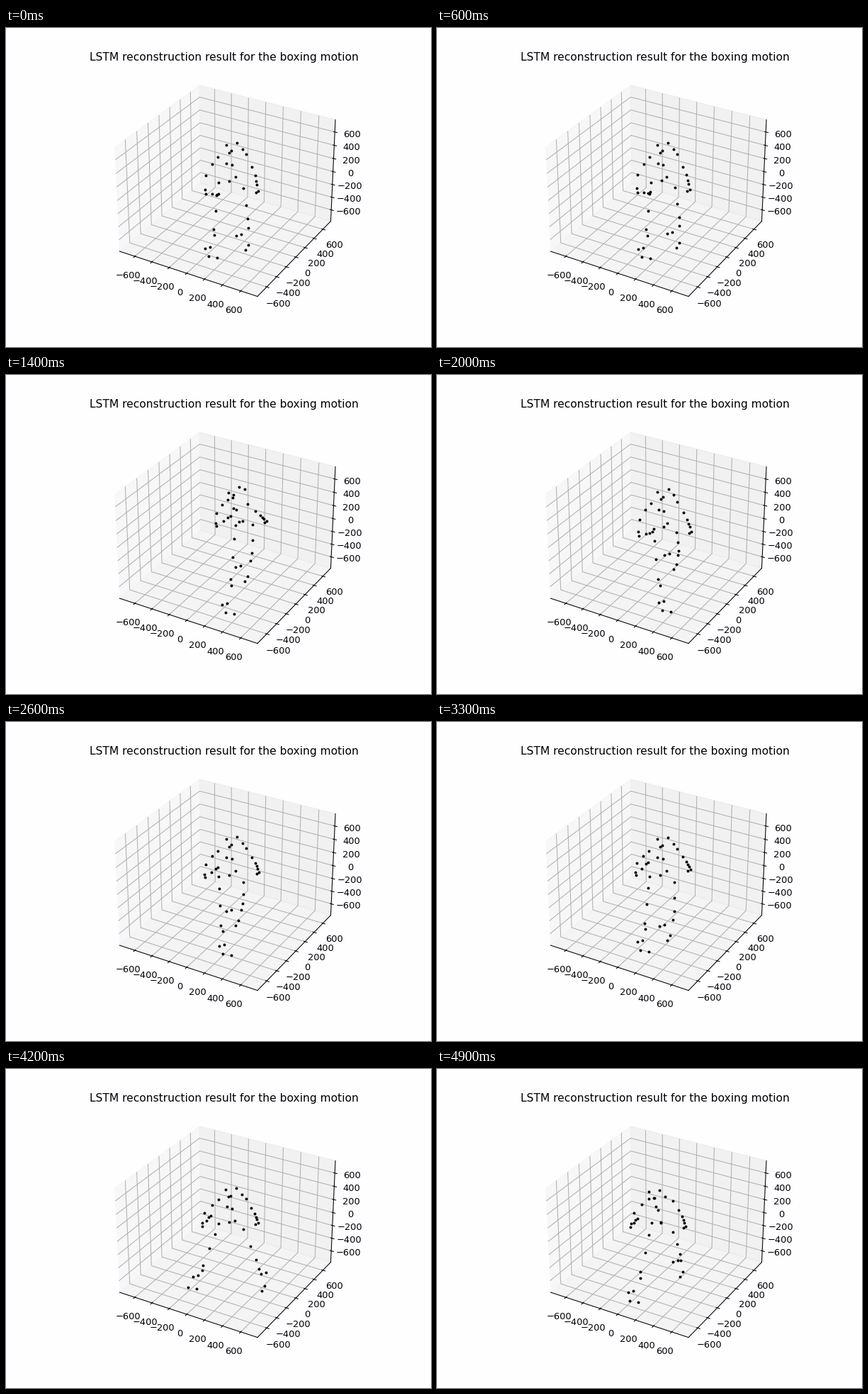
Recreate the animation shown at these times as a matplotlib script. Size 600x450 px, loop 5 s.

```python
import numpy as np
import matplotlib.pyplot as plt
from matplotlib.animation import FuncAnimation
from matplotlib.lines import Line2D

WIDTH, HEIGHT = 600, 450
FRAMES, INTERVAL = 50, 100
BACKGROUND = "#fefdff"

# Each move swells and fades around its peak: (peak, spread) in ms.
MOVES = {
    "jab": (1400, 500),
    "step": (2000, 900),
    "guard": (3000, 700),
    "side": (4200, 600),
    "lean": (4900, 400),
}


def strengths(ms):
    return {name: np.exp(-((ms - peak) / spread) ** 2)
            for name, (peak, spread) in MOVES.items()}


class Joint:
    """A resting screen point and how far each move shifts it."""

    def __init__(self, x, y, **shifts):
        self.rest = np.array([x, y], float)
        self.shifts = {move: np.array(shift) for move, shift in shifts.items()}

    def at(self, power):
        return self.rest + sum(power[m] * s for m, s in self.shifts.items())


JOINTS = {
    "head": Joint(322, 168, jab=(3, -5), side=(0, 5), lean=(-12, 7)),
    "shoulder_l": Joint(299, 182, jab=(14, -6), side=(1, 2)),
    "shoulder_r": Joint(339, 178, jab=(2, 4), side=(0, 5), lean=(-6, 7)),
    "hip_l": Joint(300, 218, jab=(24, -6), lean=(3, -1)),
    "hip_r": Joint(335, 226, jab=(13, -15), lean=(-2, 4)),
    "hand_l": Joint(300, 234, jab=(17, -35), guard=(-1, -40), side=(-10, -24), lean=(-14, -17)),
    "hand_r": Joint(356, 230, jab=(12, -24), guard=(2, -25), side=(0, -11), lean=(-5, -5)),
    "toe_l": Joint(298, 324, jab=(4, 8), step=(31, 8), side=(-29, -14), lean=(-7, 9)),
    "toe_r": Joint(342, 306, jab=(0, 4), step=(-2, -40), guard=(-18, 0), side=(24, 1), lean=(-1, -20)),
}


def between(a, b, share, shift=(0, 0)):
    return a + share * (b - a) + shift


def limb(start, end, bend, shares, bow=0):
    """Markers on a two-bone limb: share 0 is its start, 1 the bend, 2 its end."""
    middle = between(start, end, .5, bend)
    points = []
    for s in shares:
        point = between(start, middle, s) if s < 1 else between(middle, end, s - 1)
        points.append(point + (bow * max(0, np.sin(np.pi * s)), 0))
    return points


def foot(toe, sole, ball):
    heel = toe - sole
    return [toe, toe + ball, heel, heel + (7, -2)]


def markers_at(ms):
    power = strengths(ms)
    j = {name: joint.at(power) for name, joint in JOINTS.items()}
    head, left, right = j["head"], j["shoulder_l"], j["shoulder_r"]

    points = [left, right, j["hip_l"], j["hip_r"]]
    chest = between(head, between(left, right, .5), .5, (-1.5, 19))
    points += [chest + k * np.array([4.5, 17]) for k in (-1, 0, 1)]
    points.append(between(left, right, .3, (0, 10)))
    points.append(between(j["hip_l"], j["hip_r"], .43, (0, -5.5)))

    for sign in (-1, 1):
        points.append(head + sign * np.array([11.5, 3.5 - 6 * power["jab"]]))
        points.append(head + sign * np.array([4, -5.5]))

    points += limb(left, j["hand_l"], (-18, 26), (.2, .5, .88, 1, 1.5, 2), bow=-8)
    points += limb(right, j["hand_r"], (4, 4), (.6, 1, 1.35, 1.6, 2))
    points += [j[hand] + (-3.5, 2) for hand in ("hand_l", "hand_r")]

    sole = np.array([17, 13]) - power["side"] * np.array([12, -4])
    points += limb(j["hip_l"], j["toe_l"], (-6, 13), (.25, .6, 1, 1.2))
    points += limb(j["hip_r"], j["toe_r"], (3, 3), (.55, 1, 1.35))
    points += foot(j["toe_l"], sole, (-12, -2))
    points += foot(j["toe_r"], sole, (-4, 7))
    return np.array(points)


plt.rcParams["font.family"] = "DejaVu Sans"
fig = plt.figure(figsize=(6.4, 4.8), dpi=WIDTH / 6.4, facecolor=BACKGROUND)
ax = fig.add_subplot(projection="3d", facecolor=BACKGROUND)
ax.set_title("LSTM reconstruction result for the boxing motion", fontsize=11.92)

limit = 750 * 25 / 24
ax.set(xlim=(-limit, limit), ylim=(-limit, limit), zlim=(-limit, limit))
for axis in (ax.xaxis, ax.yaxis, ax.zaxis):
    axis.set_ticks(range(-600, 601, 200))

dots = fig.add_artist(Line2D([], [], color="black", linestyle="none",
                             marker="o", markersize=2, markeredgewidth=1))


def draw(frame):
    x, y = markers_at(frame * INTERVAL).T
    dots.set_data(x / WIDTH, 1 - y / HEIGHT)
    return [dots]


animation = FuncAnimation(fig, draw, frames=FRAMES, interval=INTERVAL,
                          repeat=True, repeat_delay=0)
plt.show()
```
